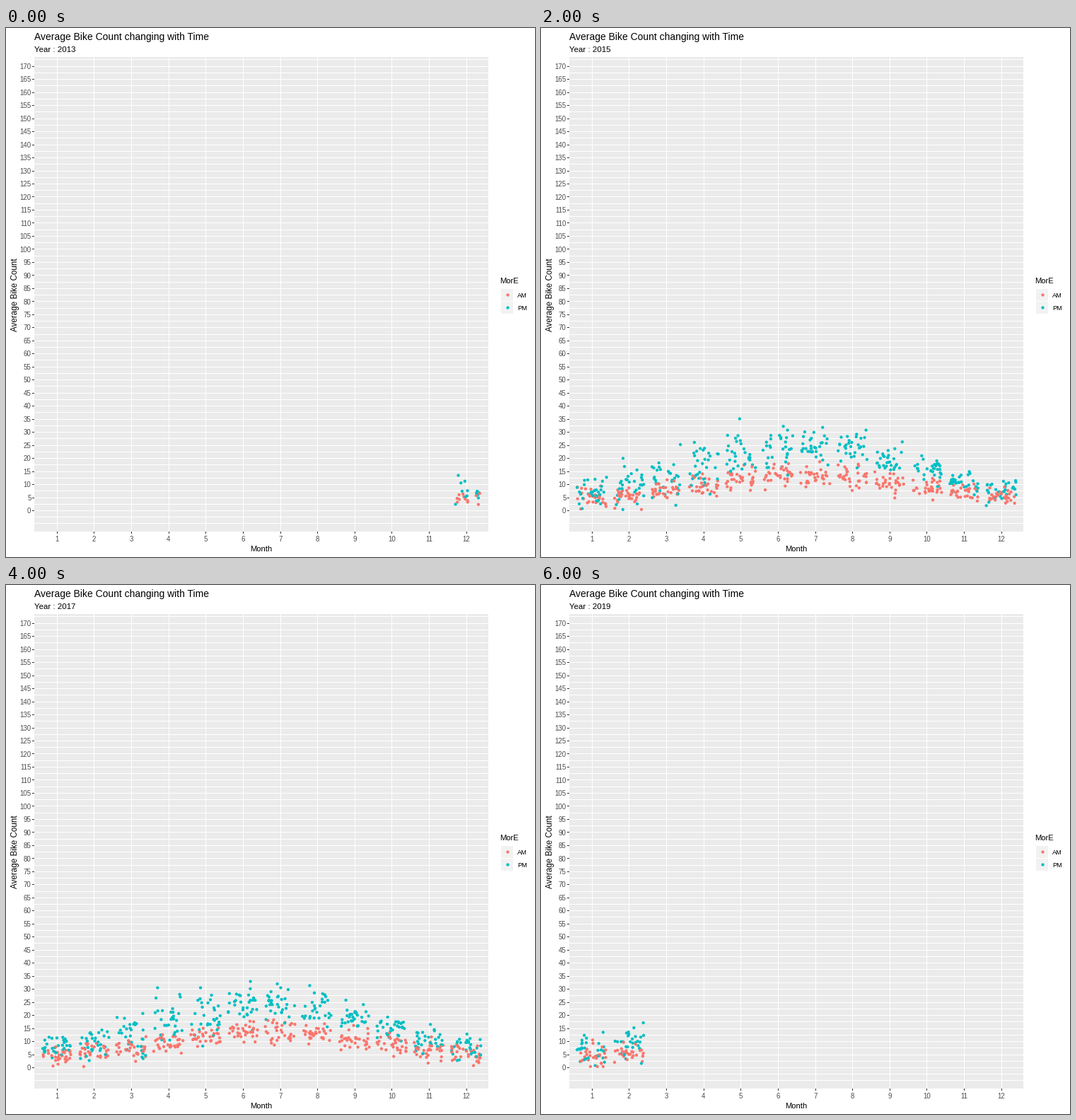
A matplotlib script that plays this animation: 748 px wide and 748 px high, repeating every 7000 ms.

```python
import numpy as np
import matplotlib.pyplot as plt
from matplotlib.animation import FuncAnimation
from matplotlib.patches import Rectangle

SIZE, DPI = 748, 100
PT = 72 / DPI  # points per pixel
AM, PM = "#F8766D", "#00BFC4"
LEFT, TOP, RIGHT, BOTTOM = 40, 41, 682, 712
FIRST_YEAR, LAST_YEAR = 2013, 2019

# Record days: (month position, count, colour)
RECORDS = {
    2016: [(5.27, 42, PM), (5.14, 39, PM)],
    2018: [(5.21, 165, AM)],
}


def to_x(month):
    return 71.8 + (month - 1) * 52.62


def to_y(count):
    return 682 - 3.696 * count


def season(month, peak):
    """Yearly wave from -1 to 1, highest at the peak month."""
    return np.cos(2 * np.pi * (month - peak) / 12)


def day_range(year):
    """Months covered by a year and the days counted in each."""
    if year == FIRST_YEAR:
        return [12], 13
    if year == LAST_YEAR:
        return [1, 2], 28
    return range(1, 13), 30


def year_points(year):
    """Pixel positions and colours of one year's dots."""
    rng = np.random.default_rng(year)
    months, days = day_range(year)
    dots = list(RECORDS.get(year, []))
    for month in months:
        summer, spring = season(month, 6.8), season(month, 4.7)
        groups = ((AM, 9.2 + 4.4 * summer, 2),
                  (PM, 15.9 + 8.7 * summer, 3.5 + 1.4 * spring))
        for color, mean, spread in groups:
            xs = month + rng.uniform(-.4, .4, days)
            ys = np.maximum(rng.normal(mean, spread, days), .3)
            dots += [(x, y, color) for x, y in zip(xs, ys)]
    dots = [dots[i] for i in rng.permutation(len(dots))]
    points = [(to_x(x), to_y(y)) for x, y, _ in dots]
    return points, [color for *_, color in dots]


fig = plt.figure(figsize=(SIZE / DPI, SIZE / DPI), dpi=DPI, facecolor="white")
ax = fig.add_axes([0, 0, 1, 1])
ax.set(xlim=(0, SIZE), ylim=(SIZE, 0))
ax.axis("off")


def box(x, y, w, h, color):
    ax.add_patch(Rectangle((round(x), round(y)), w, h, fc=color, lw=0))


def label(x, y, text, px, color="black", **kw):
    return ax.text(x, y, text, fontsize=px * PT, color=color, va="baseline",
                   family="Liberation Sans", **kw)


def scatter(points, colors):
    return ax.scatter(*np.transpose(points), s=(4.3 * PT) ** 2, c=colors,
                      linewidths=0, zorder=3)


# Panel, grid and axes
box(LEFT, TOP, RIGHT - LEFT, BOTTOM - TOP, "#EBEBEB")
for count in np.arange(-5, 173, 2.5):
    box(LEFT, to_y(count), RIGHT - LEFT, 1, "white")
for count in range(0, 171, 5):
    y = to_y(count)
    box(LEFT - 3, y, 3, 1, "#333333")
    label(35.5, y + 4.2, str(count), 9.8, "#4D4D4D", ha="right")
for month in range(1, 13):
    x = to_x(month)
    box(x, TOP, 1, BOTTOM - TOP, "white")
    box(x, BOTTOM, 1, 3, "#333333")
    label(x + .3, 726, str(month), 9.8, "#4D4D4D", ha="center")

# Titles
label(40, 17, "Average Bike Count changing with Time", 13.9)
subtitle = label(40, 34, "", 11.5)
label(360.5, 740, "Month", 11.3, ha="center")
label(16, 377, "Average Bike Count", 11.6, ha="center", rotation=90,
      rotation_mode="anchor")

# Legend
label(698.5, 361, "MorE", 11.2)
for y, name, color in ((377, "AM", AM), (395, "PM", PM)):
    box(700, y - 8, 17, 17, "#F2F2F2")
    scatter([(709, y)], [color])
    label(723, y + 4.2, name, 9.3)

years = range(FIRST_YEAR, LAST_YEAR + 1)
frames = [year_points(year) for year in years]
cloud = scatter(*frames[0])


def draw(i):
    points, colors = frames[i]
    cloud.set_offsets(points)
    cloud.set_facecolor(colors)
    subtitle.set_text(f"Year : {years[i]}")
    return cloud, subtitle


anim = FuncAnimation(fig, draw, frames=len(years), interval=1000,
                     repeat=True, repeat_delay=0)
plt.show()
```
